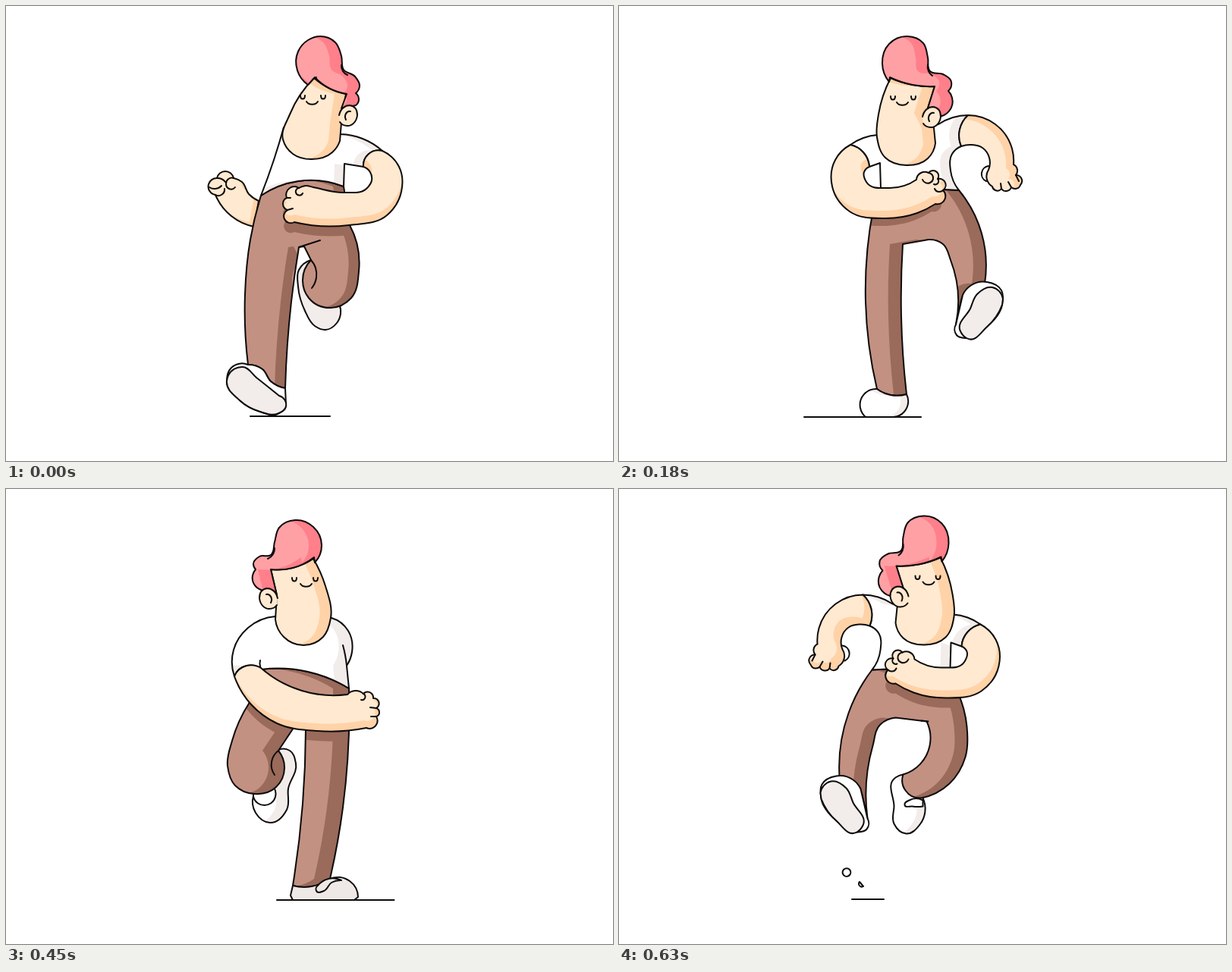
An HTML page for the animation above (0.72 s loop, 800 px wide and 600 px high).

```html
<!DOCTYPE html>
<html lang="en">
<head>
<meta charset="utf-8">
<title>Run cycle</title>
<style>
html, body { margin: 0; width: 100%; height: 100%; overflow: hidden; background: #fff; }
svg { display: block; width: 100%; height: 100%; }
.pose { visibility: hidden; animation: show 720ms step-end infinite; }
.line { fill: none; stroke: #0d0b0b; stroke-width: 2; stroke-linecap: round; stroke-linejoin: round; }
@keyframes show {
  0% { visibility: visible; }
  12.5%, 100% { visibility: hidden; }
}
</style>
</head>
<body>
<svg id="stage" viewBox="0 0 800 600"></svg>
<script>
// Fill and shade, then the same for a mirrored figure where it differs
const tones = {
  skin: ['#ffe9d0', '#ffd2a8'],
  hair: ['#ffa0a5', '#ff7f8a'],
  cloth: ['#c39182', '#9a6a5a'],
  white: ['#ffffff', '#f2ecea'],
  shoe: ['#ffffff', '#f2ecea', '#eee8e6', '#eee8e6'],
  heel: ['#f2ecea', '#dfd0cc', '#ffffff', '#f2ecea'],
  sole: ['#f2ecea', '#f2ecea', '#dfd0cc', '#dfd0cc']
};

const sub = (a, b) => ({ x: a.x - b.x, y: a.y - b.y });
const unit = v => { const l = Math.hypot(v.x, v.y) || 1; return { x: v.x / l, y: v.y / l }; };

// Curve made of arcs through the points; "!" marks a corner
function curve(text, closed = true) {
  const pts = text.split(' ').map(s => {
    const [x, y] = s.split(',').map(parseFloat);
    return { x, y, corner: s.endsWith('!') };
  });
  const n = pts.length;
  if (!closed) pts[0].corner = pts[n - 1].corner = true;
  pts.forEach((p, i) => {
    if (p.corner) return;
    const a = sub(p, pts[(i + n - 1) % n]), b = sub(pts[(i + 1) % n], p);
    const la = a.x * a.x + a.y * a.y, lb = b.x * b.x + b.y * b.y;
    p.dir = unit({ x: a.x / la + b.x / lb, y: a.y / la + b.y / lb });
  });
  let d = `M${pts[0].x} ${pts[0].y}`;
  for (let i = 0; i < (closed ? n : n - 1); i++) {
    const p = pts[i], q = pts[(i + 1) % n];
    const chord = sub(q, p), len = Math.hypot(chord.x, chord.y), u = unit(chord);
    const dot = v => v.x * u.x + v.y * u.y;
    const reflect = v => ({ x: 2 * dot(v) * u.x - v.x, y: 2 * dot(v) * u.y - v.y });
    const s = p.dir || (q.dir ? reflect(q.dir) : u);
    const e = q.dir || (p.dir ? reflect(p.dir) : u);
    const reach = v => len * 2 / (3 * (1 + Math.max(0, dot(v))));
    const hs = reach(s), he = reach(e);
    d += `C${p.x + s.x * hs} ${p.y + s.y * hs} ${q.x - e.x * he} ${q.y - e.y * he} ${q.x} ${q.y}`;
  }
  return d + (closed ? 'Z' : '');
}

let flip = false, clips = 0;
const line = d => `<path class="line" d="${d}"/>`;
const ink = (...strokes) => line(strokes.map(s => curve(s, false)).join(''));

// Shade is what a copy moved towards the light leaves uncovered; caster drops a shadow
function part(tone, points, dx = 0, dy = 0, caster = '') {
  const d = curve(points), t = tones[tone];
  const [base, dark] = flip && t.length > 2 ? t.slice(2) : t;
  const id = 'c' + clips++;
  return `<clipPath id="${id}"><path d="${d}"/></clipPath><g clip-path="url(#${id})">
    <path d="${d}" fill="${dark}"/>
    <path d="${d}" fill="${base}" transform="translate(${flip ? dx : -dx} ${-dy})"/>
    ${caster && `<path d="${curve(caster)}" fill="${dark}" transform="translate(0 13)"/>`}</g>` + line(d);
}

const smile = (x, y, gap) => line(
  `M${x} ${y}c0 6 6 6 6 0M${x + gap} ${y}c0 6 6 6 6 0M${x + 8} ${y + 8}c3 5 12 5 15 0`);

const ear = (x, y) => {
  const d = `M${x - 13} ${y - 1}c2-9 8-13 14-13c7 1 10 6 10 13c-1 9-7 14-13 14c-4 0-8-2-10-5`;
  return `<path d="${d}" fill="${tones.skin[0]}"/>` + line(d + `M${x - 4} ${y + 5}c-3-6 1-12 6-11`);
};

const move = (x, y, body) => `<g transform="translate(${x} ${y})">${body}</g>`;

const contactArm = '471,212! 477,196 496,191! 518,212 521,245 502,276 452,289 380,285! 367,281 371,269! 365,261 370,253! 374,240 386,240! 395,237 405,239 446,246 476,240 482,230';
const contact = () =>
  part('skin', '327,291! 297,277 276,249! 267,235 278,227! 289,218 300,227! 311,232 320,248 333,257!', 6, 6) +
  ink('268,239 276,241 284,237', '278,227 284,228 289,232', '300,227 290,234 294,241 302,239', '276,249 284,249 288,241') +
  part('heel', '402,335! 386,348 385,370 394,402 407,422 421,427 436,418 439,393!', flip ? 14 : 0) +
  part('cloth', '336,250! 385,231 445,238! 453,289! 465,350 455,385 428,398 399,385 391,362 402,335! 393,317! 386,318! 376,390 368,504! 349,495 338,479 319,473! 315,380 322,308', 14, 0, contactArm) +
  ink('386,318 414,309', '402,335 409,358 403,372') +
  part('white', '319,473! 297,477 291,494 308,520 335,535 358,538 369,526! 368,504! 349,495 338,479') +
  part('sole', '293,487! 312,476 330,490 360,514! 369,528 357,538 335,535 308,520 291,494') +
  part('white', '366,160! 353,203 336,250! 385,231 445,238! 446,208! 471,212! 477,196 496,191! 470,175 441,169!', 13) +
  part('skin', '406,95! 374,143 365,176 378,195 403,202 430,193 440,178! 442,154! 448,116! 427,109', 15) +
  smile(388, 118, 27) +
  part('hair', '398,104! 384,85 385,60 398,45 414,40 434,48 442,66 445,84 460,93 466,106 461,115! 465,123 461,131! 442,135! 449,116! 427,109 407,94!', 16) +
  ink('442,78 444,86 450,91', '404,97 409,94') +
  ear(452, 145) +
  part('skin', contactArm, 0, 10) +
  ink('386,240 382,246 391,247', '370,253 375,253', '371,269 378,267');

const standArm = '439,236! 458,233 474,247! 452,284 418,309 365,319 300,315! 286,309 287,300! 283,294 287,289! 284,280 291,276! 294,269 304,270! 315,266 325,271! 385,266';
const stand = () =>
  part('heel', '416,344! 401,345 393,362 403,395 405,423 427,440 446,427 449,405! 446,380!', 16) +
  part('white', '449,406! 420,406 420,398 449,400!') +
  part('cloth', '323,263! 377,241 439,238! 455,283! 477,332 483,365 473,391 448,402 419,393 408,368 416,345! 396,315! 380,317! 384,415 397,523! 372,524 348,514! 331,420', 21, 0, standArm) +
  ink('416,345 425,360 421,377') +
  part('shoe', '348,514! 322,517 311,538! 316,542! 397,542! 400,536! 397,523! 372,524', 10) +
  part('shoe', '333,516! 350,514 364,523! 366,530 356,530 346,519') +
  part('white', '346,170! 324,187 319,215 326,233! 323,263! 377,241 439,238! 458,233 474,247! 475,212 456,183 420,168!', 18) +
  ink('331,206 328,219 326,233', '440,226 440,234 436,241') +
  part('skin', '370,92! 354,128 347,170 357,195 383,206 409,195 420,172! 418,140! 426,106! 397,104', 15) +
  smile(364, 117, 28) +
  part('hair', '368,97! 359,74 370,50 394,41 415,51 421,70 426,87 441,89 449,99 446,106! 450,114 439,133! 418,140! 426,106! 397,104 369,90!', 17) +
  ink('421,78 423,86 430,92') +
  ear(430, 145) +
  part('skin', standArm, 3, 10) +
  ink('304,270 302,276 307,278', '287,289 295,288', '287,300 294,300');

const swingArm = '300,180! 280,200 276,235 299,268 345,277 388,270 412,258! 425,250 422,240! 425,230 415,225! 414,216 403,217! 393,217 387,226! 350,237 321,229 318,216 325,209! 317,190';
const upper = () =>
  part('white', '336,167! 317,171 300,180! 317,190 325,209! 339,204! 340,238! 424,239! 443,240! 432,214 434,192 446,182! 444,160 455,141! 435,144 416,153!', 13) +
  part('skin', '455,141! 491,153 513,185 515,206! 520,213 518,220! 526,226 524,233! 518,238 512,236! 506,241 499,238! 491,240 487,235! 480,226 482,213! 483,197 474,184 460,180 446,182! 444,160', 10, flip ? 10 : -5) +
  ink('482,208 473,217 479,228', '499,238 498,231', '512,236 508,229', '518,220 522,228') +
  part('skin', '353,92! 337,140 335,170 346,197 374,207 402,198 412,178! 410,158! 400,138! 411,103! 382,101', 16) +
  smile(353, 116, 27) +
  part('hair', '351,97! 342,73 351,47 375,37 396,46 402,65 405,83 422,87 433,97 429,109! 434,118 414,143! 400,138! 411,103! 382,101 352,91!', 16) +
  ink('402,74 403,83 408,89') +
  ear(408, 144) +
  part('skin', swingArm, 4, 10) +
  ink('403,217 409,225 405,230 395,226', '415,225 415,231 410,232', '422,240 417,242 411,238');

const boot = () =>
  part('white', '449,436! 450,450 463,454 490,439 510,410 509,391 490,380 468,385 458,397!') +
  part('white', '511,402! 497,387 477,396 468,415 455,445 463,454 490,439 510,410!', 40, 60);

const fly = () =>
  part('white', '402,378! 412,382 414,420 414,443 398,456 380,444 376,409!', 11) +
  part('white', '376,412! 394,412 400,417 390,420 376,420!') +
  part('cloth', '330,270! 424,239! 443,240! 474,297 486,380! 467,388 456,405! 449,436! 442,340 432,312 412,303! 371,308! 367,340 402,378! 399,399 378,409! 341,390 320,355 318,315', 17, 0, swingArm) +
  ink('369,308 378,307') + boot() + upper();

const push = () =>
  part('cloth', '335,268! 429,242! 448,243! 478,300 482,366! 460,373 451,388! 444,420! 437,335 427,314 408,308! 374,314! 372,410 379,512! 358,513 340,505! 325,390', 17, 0, swingArm) +
  part('shoe', '340,505! 318,530 325,542! 362,542! 376,535 379,512! 358,513', 10) +
  move(-5, -16, boot()) + move(5, 3, upper());

function figure(body, sum = 0, dy = 0) {
  flip = sum > 0;
  return `<g transform="${flip ? `matrix(-1 0 0 1 ${sum} ${dy})` : ''}">${body()}</g>`;
}
const ground = (a, b, y = 542) => line(`M${a} ${y}H${b}`);
const puff = (x, y, rx, ry = rx) => `<ellipse class="line" cx="${x}" cy="${y}" rx="${rx}" ry="${ry}"/>`;

const poses = [
  ground(322, 427, 541) + figure(contact),
  ground(263, 417) + puff(536.5, 583.5, 16.5, 4) + figure(stand),
  ground(244, 398) + figure(push),
  puff(429.5, 496.5, 6.3) + puff(409.3, 520, 2.8) + puff(432.3, 522.8, 3.8, 2.4) + figure(fly),
  ground(322.5, 476.5) + figure(contact, 776, 1.5),
  ground(357, 511.5) + figure(stand, 775),
  ground(378, 532) + figure(push, 776.5, -1.5),
  ground(307, 349, 541) + line(curve('296,502! 304,502 304,509 297,510') + curve('317,518! 322,524! 316,521')) +
    figure(fly, 776.5, -1.5)
];

document.getElementById('stage').innerHTML = poses.map((pose, i) =>
  `<g class="pose" style="animation-delay:${i ? (i - poses.length) * 90 : 0}ms">${pose}</g>`).join('');
</script>
</body>
</html>
```
